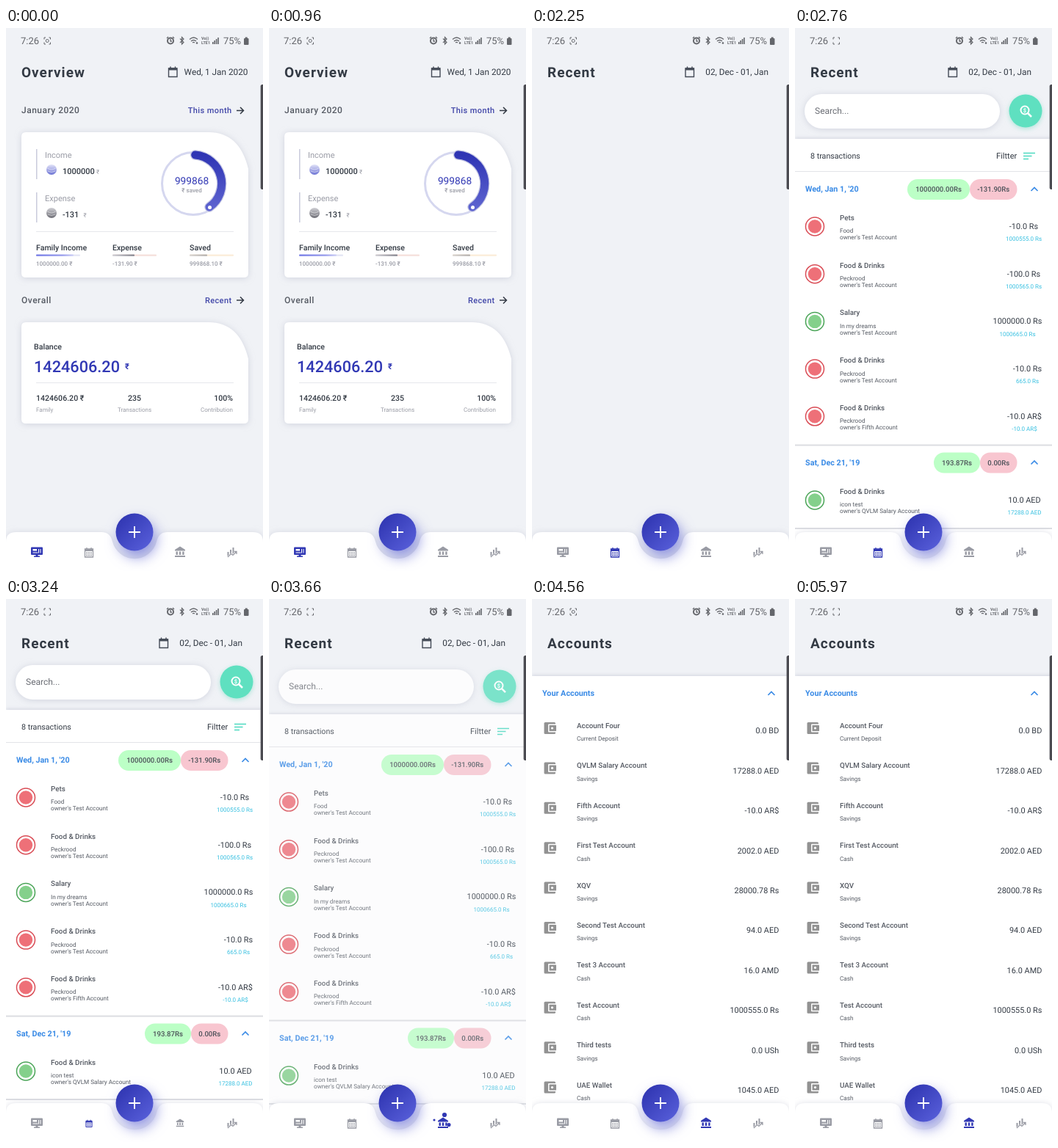
Recreate the animation shown at these times as an HTML page. Size 350x740 px, loop 6000 ms.

```html
<!DOCTYPE html>
<html lang="en">
<head>
<meta charset="utf-8">
<title>Budget app</title>
<style>
  html, body { margin: 0; width: 100%; height: 100%; overflow: hidden; background: #f0f2f6; }
  svg { display: block; width: 350px; height: 740px; font-family: Roboto, "Noto Sans", sans-serif; text-rendering: geometricPrecision; }
  .card { fill: #fff; filter: drop-shadow(0 1px 4px #b9bccb90); }
  .line { fill: none; stroke: currentColor; }
</style>
</head>
<body>
<svg id="stage" viewBox="0 0 350 740">
  <defs>
    <linearGradient id="fabFill" x1="0" y1="0" x2="1" y2="1"><stop offset=".1" stop-color="#3036b2"/><stop offset=".9" stop-color="#565dd8"/></linearGradient>
    <linearGradient id="arcFill" x1="0" y1="0" x2="0" y2="1"><stop stop-color="#2f35b4"/><stop offset="1" stop-color="#5c62cf"/></linearGradient>
    <linearGradient id="blueBar"><stop stop-color="#7f85e8"/><stop offset=".7" stop-color="#a3a7ee"/><stop offset="1" stop-color="#d3d5f6"/></linearGradient>
    <linearGradient id="greyBar"><stop stop-color="#d4d3d8"/><stop offset="1" stop-color="#8d8d96"/></linearGradient>
    <linearGradient id="sandBar"><stop stop-color="#dcd8d4"/><stop offset="1" stop-color="#b9b5b2"/></linearGradient>
    <linearGradient id="ball" x1="0" y1="0" x2="0" y2="1"><stop stop-color="#e3e4f8"/><stop offset="1" stop-color="#6d74d4"/></linearGradient>
    <linearGradient id="darkBall" x1="0" y1="0" x2="0" y2="1"><stop stop-color="#cfcfd4"/><stop offset="1" stop-color="#6e6e76"/></linearGradient>
  </defs>
</svg>
<script>
const DARK = '#333a44', MID = '#555a63', PALE = '#9a9ca6', INDIGO = '#3138b4', BLUE = '#3a8be6', CYAN = '#35bfe0';

// y is the middle of the capitals
const text = (x, y, str, size, fill, { w = 400, a = 'start', ls = 0, id = '' } = {}) =>
  `<text x="${x}" y="${y + size * .355}" font-size="${size}" fill="${fill}" font-weight="${w}" text-anchor="${a}" letter-spacing="${ls}" ${id && `id="${id}"`}>${str.replace('&', '&amp;')}</text>`;
const rect = (x, y, w, h, fill, r = 0, more = '') => `<rect x="${x}" y="${y}" width="${w}" height="${h}" rx="${r}" fill="${fill}" ${more}/>`;
const disc = (x, y, r, fill, more = '') => `<circle cx="${x}" cy="${y}" r="${r}" fill="${fill}" ${more}/>`;
const path = (d, color, w = 1.5, more = '') => `<path class="line" d="${d}" color="${color}" stroke-width="${w}" ${more}/>`;
const group = (id, body) => `<g id="${id}">${body}</g>`;

const arrow = y => path(`M314 ${y}h9m-4-4.5l4.5 4.5l-4.5 4.5`, DARK);
const chevron = y => path(`M321.5 ${y + 2.5}l4.5-4.5l4.5 4.5`, BLUE, 1.7);
const dateIcon = x => path(`M${x} 55h11.5v11.5h-11.5zM${x + 2.5} 52.5v2M${x + 9} 52.5v2`, '#444b57', 1.4) + rect(x, 54.5, 11.5, 3, '#444b57');
const card = (y, h) => `<path class="card" d="M27 ${y}H276Q318 ${y} 330 ${y + 50}V${y + h - 6}q0 6-6 6H27q-6 0-6-6V${y + 6}q0-6 6-6z"/>`;
const rule = y => path(`M41 ${y}H310`, '#e6e7ec', 1);

function statusBar() {
  const c = '#64666b';
  const corners = 'M52 15.5v-2.5h2M58.5 13h2v2.5M60.5 19.5v2.5h-2M54 22h-2v-2.5';
  const bars = [3, 5, 7, 9].map((h, i) => rect(281 + i * 2.4, 22 - h, 1.6, h, c)).join('');
  return text(20, 17.5, '7:26', 13, c) + path(corners, c, 1) +
    group('face', disc(56.2, 17.5, 2, 'none', `stroke="${c}"`)) +
    disc(224, 17.5, 4, 'none', `stroke="${c}" stroke-width="2"`) +
    path('M224 15v3h2M219 14l2-2M229 14l-2-2', c, 1.3) +
    path('M237 14.5l5 5l-2.5 2.5v-9.5l2.5 2.5l-5 5', c, 1.2) +
    path('M250 15.5q5.5-5 11 0M252 18q3.5-3 7 0M254 20q1.5-1.2 3 0', c, 1.3) + disc(260, 20.5, 1.3, c) +
    text(266, 14.5, 'Vo))', 5.5, c, { w: 700 }) + text(266, 20, 'LTE1', 5.5, c, { w: 700 }) + bars +
    text(296, 17.5, '75%', 13, c) + rect(324, 14, 6.5, 9, c, 1) + rect(325.7, 12.5, 3, 2, c);
}

const header = (id, title, date, iconX, dateEnd) => group(id, text(21, 60, title, 19, DARK, { w: 700, ls: 1 }) +
  (date ? dateIcon(iconX) + text(dateEnd, 59.5, date, 11.8, DARK, { a: 'end' }) : ''));

const sectionHead = (y, left, right) => text(21, y, left, 12, MID, { w: 500, ls: .5 }) +
  text(307.5, y + .5, right, 11, '#4046a8', { w: 500, a: 'end', ls: .4 }) + arrow(y + .5);

function monthSection() {
  const flow = (y, name, id, fill) => rect(41, y - 8, 1.5, 41, '#c9cbdc') + text(53, y, name, 11, PALE) +
    disc(62, y + 20, 7, `url(#${fill})`) + path(`M56.5 ${y + 18}q5.5 4 11 0M57 ${y + 22}q5 3 10 0`, '#fff', .8, 'opacity=".6"') +
    text(77, y + 22.5, '', 11, DARK, { w: 500, id }) + text(105.5, y + 23.5, '₹', 8, PALE, { id: id + 'Unit' });
  const column = (x, name, value, fill, len, back) => text(x, 299, name, 10.6, DARK, { w: 500 }) +
    rect(x, 308.5, 60, 2.5, back, 1) + rect(x, 308.5, len, 2.5, `url(#${fill})`, 1) + text(x, 321.5, value + ' ₹', 8, PALE, { w: 500 });
  const arc = (stroke, w) => path('M257.7 173A39.1 39.1 0 0 1 277 244', stroke, w, `style="stroke:${stroke}" stroke-linecap="round"`);
  return sectionHead(112, 'January 2020', 'This month') + card(142, 198) +
    flow(173, 'Income', 'income', 'ball') + flow(232, 'Expense', 'expense', 'darkBall') +
    disc(255, 212, 42.5, 'none', 'stroke="#d5d7ef" stroke-width="3"') +
    arc('#c4c6e4', 13.5) + arc('url(#arcFill)', 11) + disc(277.5, 244.5, 2.5, '#fff') +
    text(253, 208.5, '', 13.7, INDIGO, { a: 'middle', id: 'saved' }) + text(253, 221, '₹ saved', 8, PALE, { w: 500, a: 'middle' }) +
    rule(277.5) +
    column(41, 'Family Income', '1000000.00', 'blueBar', 51, '#e6e7f5') +
    column(145, 'Expense', '-131.90', 'greyBar', 30, '#f6e2de') +
    column(250, 'Saved', '999868.10', 'sandBar', 24, '#fbeedc');
}

function overallSection() {
  const stat = (x, a, value, name) => text(x, 504.5, value, 10.6, DARK, { w: 500, a }) + text(x, 520.5, name, 8, PALE, { a });
  return sectionHead(370.5, 'Overall', 'Recent') + card(401, 138) +
    text(38, 434.5, 'Balance', 10.6, DARK, { w: 500 }) +
    text(38, 461, '1424606.20', 21.7, INDIGO, { w: 500 }) + text(162, 461.5, '₹', 11, INDIGO, { w: 700 }) + rule(483.5) +
    stat(41, 'start', '1424606.20 ₹', 'Family') + stat(175, 'middle', '235', 'Transactions') + stat(309, 'end', '100%', 'Contribution');
}

const panel = y => rect(0, y, 350, 740, '#fff', 0, 'style="filter:drop-shadow(0 -1px 2px #b9bccb90)"');
const divider = y => rect(0, y - 1, 350, 2, '#dcdde2');
const listHead = (y, str) => text(14, y, str, 10.8, BLUE, { w: 700 }) + chevron(y);

function recentList() {
  const pill = (x, y, w, fill, str) => rect(x, y - 14, w, 28, fill, 14) + text(x + w / 2, y, str, 9.6, '#4b5058', { w: 500, a: 'middle' });
  const dayHead = (y, day, start, split, plus, minus) => listHead(y, day) +
    pill(start, y + .5, split - start, '#bcffc6', plus) + pill(split, y + .5, 302.5 - split, '#f8c6d0', minus);
  const entry = (y, name, note, account, mid, amount, total, good) => {
    const [edge, fill] = good ? ['#4aa457', '#84d08b'] : ['#d94c55', '#ee7078'];
    return disc(27, y, 12.5, '#fff', `stroke="${edge}" stroke-width="1.5"`) + disc(27, y, 9.2, fill) +
      text(61, y - 12, name, 9.8, MID, { w: 500 }) + text(61, y + 6, note, 8.2, MID) +
      text(61, y + 15, "owner's " + account, 8.2, MID) +
      text(mid, y - .5, amount, 10.9, DARK, { a: 'middle' }) + text(mid, y + 17, total, 8, CYAN, { a: 'middle' });
  };
  const rows = [
    ['Pets', 'Food', 'Test Account', 311.5, '-10.0 Rs', '1000555.0 Rs'],
    ['Food & Drinks', 'Peckrood', 'Test Account', 311.5, '-100.0 Rs', '1000565.0 Rs'],
    ['Salary', 'In my dreams', 'Test Account', 303, '1000000.0 Rs', '1000665.0 Rs', true],
    ['Food & Drinks', 'Peckrood', 'Test Account', 316.5, '-10.0 Rs', '665.0 Rs'],
    ['Food & Drinks', 'Peckrood', 'Fifth Account', 312.5, '-10.0 AR$', '-10.0 AR$'],
  ];
  return rect(13, 90, 266, 47, '#fff', 23.5, 'class="card"') + text(27, 113, 'Search...', 12, '#6b6e75') +
    disc(314, 113, 22.5, '#5fe0c0', 'style="filter:drop-shadow(0 2px 3px #7fd9c490)"') +
    disc(313, 112, 5.5, 'none', 'stroke="#fff" stroke-width="2"') + path('M317 116l5 5', '#fff', 2.5) +
    text(313, 112, '$', 7.5, '#fff', { w: 700, a: 'middle' }) +
    panel(151) + text(21, 174.5, '8 transactions', 10.7, DARK) + text(274, 174.5, 'Filtter', 11, DARK) +
    path('M311 170.5h16M311 174.5h11.5M311 178.5h7', '#4cd9c0', 1.6) + rect(0, 195, 350, 1, '#e3e4e8') +
    dayHead(219.5, "Wed, Jan 1, '20", 153, 238, '1000000.00Rs', '-131.90Rs') +
    rows.map((r, i) => entry(270.5 + i * 64.7, ...r)).join('') + divider(568.5) +
    dayHead(592, "Sat, Dec 21, '19", 189, 252, '193.87Rs', '0.00Rs') +
    entry(643.5, 'Food & Drinks', 'icon test', 'QVLM Salary Account', 312.5, '10.0 AED', '17288.0 AED', true) + divider(682);
}

function accountList() {
  const rows = [
    ['Account Four', 'Current Deposit', '0.0 BD'], ['QVLM Salary Account', 'Savings', '17288.0 AED'],
    ['Fifth Account', 'Savings', '-10.0 AR$'], ['First Test Account', 'Cash', '2002.0 AED'],
    ['XQV', 'Savings', '28000.78 Rs'], ['Second Test Account', 'Savings', '94.0 AED'],
    ['Test 3 Account', 'Cash', '16.0 AMD'], ['Test Account', 'Cash', '1000555.0 Rs'],
    ['Third tests', 'Savings', '0.0 USh'], ['UAE Wallet', 'Cash', '1045.0 AED'],
  ];
  const grey = '#929292';
  const wallet = y => rect(16.5, y - 8, 15.5, 16, grey, 1.5) + rect(22, y - 5.5, 12, 11, '#fff', 1) +
    rect(23.5, y - 4, 9.5, 8, grey, .5) + disc(27.5, y, 1.6, '#fff');
  return panel(105) + listHead(128.5, 'Your Accounts') +
    rows.map(([name, kind, sum], i) => {
      const y = 172.5 + i * 54.4;
      return wallet(y + 3.5) + text(61, y, name, 9.8, MID, { w: 500 }) + text(61, y + 18, kind, 8.2, MID) +
        text(336.3, y + 7, sum, 10.9, DARK, { a: 'end' });
    }).join('');
}

// Tab icons are drawn around 0,0
const own = 'currentColor';
const TABS = [
  [42, 714, rect(-8, -6.5, 16, 10.5, own, 1) + rect(-1.5, 4, 3, 2, own) + rect(-4, 5.5, 8, 1.5, own) +
    rect(-5.5, -4, 5.5, 2.5, '#fff') + rect(-5.5, .5, 7, 1, '#fff') + rect(2, -4, 1, 5.5, '#fff') + rect(4.5, -4, 1, 5.5, '#fff')],
  [113, 715, '<path class="line" d="M-5.5-5h11v11h-11zM-3-7v3M3-7v3" stroke-width="1.3"/>' + rect(-5.5, -5, 11, 3, own) +
    [0, 3].map(y => [-3.7, -.9, 1.9].map(x => rect(x, y - .5, 1.8, 1.8, own)).join('')).join('')],
  [237, 714, '<path d="M-7-3L0-7.5L7-3V-1.5H-7zM-7 5H7V7H-7z" fill="currentColor"/>' + [-5.5, -1.2, 3.2].map(x => rect(x, -.5, 2.4, 4.5, own)).join('')],
  [308, 715, '<path class="line" d="M-6 6l4.5-4.5l2.5 2L6-1.5M2.800-1.500H6V2" stroke-width="1.3"/>' +
    '<path d="M-6.500-1h2v4l-2 2zM-3-4h2v4l-2 2zM.500-7h2v7l-2 2z" fill="currentColor"/>'],
];

function navBar() {
  return `<path class="card" d="M0 700Q0 687 14 687H130Q142 687 145 700A31 31 0 0 0 205 700Q208 687 220 687H336Q350 687 350 700V740H0z"/>` +
    disc(175, 687, 25.5, 'url(#fabFill)', 'style="filter:drop-shadow(4px 9px 9px #5a5fd0a8)"') +
    path('M167 687h16M175 679v16', '#fff', 1.8) +
    TABS.map((tab, i) => group('tab' + i, tab[2])).join('') +
    group('dots', disc(0, 0, 1, INDIGO).repeat(3));
}

const stage = document.getElementById('stage');
stage.innerHTML += rect(0, 0, 350, 740, '#f0f2f6') + group('month', monthSection()) + group('overall', overallSection()) +
  group('recent', recentList()) + group('accounts', accountList()) +
  header('head0', 'Overview', 'Wed, 1 Jan 2020', 221.5, 329.5) + header('head1', 'Recent', '02, Dec - 01, Jan', 209, 322) + header('head2', 'Accounts') +
  statusBar() + rect(346.7, 77, 8, 143, '#4b4b51', 2.5) + navBar();

const $ = id => document.getElementById(id);
const clamp = x => Math.min(1, Math.max(0, x));
const leave = (t, start, len) => 1 - clamp((t - start) / len) ** 2;
const enter = (t, start, len) => { const p = clamp((t - start) / len); return p * p * (3 - 2 * p); };

function place(id, v) {
  const g = $(id);
  g.setAttribute('opacity', v);
  g.setAttribute('transform', `translate(0 ${30 * (1 - v)})`);
  g.style.display = v > 0 ? '' : 'none';
}

const TAPS = [1110, 3100], TAP_LEN = 700, SWAP = .4;
const DOTS = [[-12, -4, 1.7], [2, -11, 3.4], [8, 2.5, 2.8]];

function drawTabs(t) {
  const step = t < TAPS[0] ? -1 : t < TAPS[1] ? 0 : 1;
  const p = step < 0 ? 1 : clamp((t - TAPS[step]) / TAP_LEN);
  const active = p < SWAP ? step : step + 1;
  const dip = p < SWAP ? 1 - .5 * p / SWAP : Math.min(1, .5 + .5 * (p - SWAP) / .35);
  TABS.forEach(([x, y], i) => {
    const moving = step >= 0 && (i === step || i === step + 1);
    $('tab' + i).setAttribute('transform', `translate(${x} ${y}) scale(${moving ? dip : 1})`);
    $('tab' + i).style.color = i === active ? INDIGO : '#999ba4';
  });
  const grow = clamp((p - .35) / .2), size = grow * clamp((1 - p) / .22);
  const [x, y] = TABS[step + 1];
  $('dots').setAttribute('transform', `translate(${x} ${y})`);
  DOTS.forEach(([dx, dy, r], i) => {
    const dot = $('dots').children[i];
    dot.setAttribute('cx', dx * grow);
    dot.setAttribute('cy', dy * grow);
    dot.setAttribute('r', r * size);
  });
}

function drawCounters(v) {
  const income = String(Math.floor(1e6 * v));
  $('income').textContent = income;
  $('incomeUnit').setAttribute('x', 79.5 + income.length * 6.2);
  $('expense').textContent = Math.trunc(-131.9 * v);
  $('saved').textContent = Math.floor(999868 * v);
}

function draw(t) {
  const first = leave(t, 1443.235, 600);
  place('month', first);
  place('overall', leave(t, 1383, 600));
  place('recent', t < 3000 ? enter(t, 2240, 500) : leave(t, 3436, 500));
  place('accounts', enter(t, 3990, 550));
  drawCounters(first);
  const page = t < 2050 ? 0 : t < 3940 ? 1 : 2;
  for (let i = 0; i < 3; i++) $('head' + i).style.display = i === page ? '' : 'none';
  $('face').style.display = t < 2500 || (t >= 4200 && t < 5310) ? '' : 'none';
  drawTabs(t);
}

const began = performance.now();
function tick() {
  const t = (performance.now() - began) % 6000;
  draw(Math.floor(t / 30) * 30);
  requestAnimationFrame(tick);
}
tick();
</script>
</body>
</html>
```
